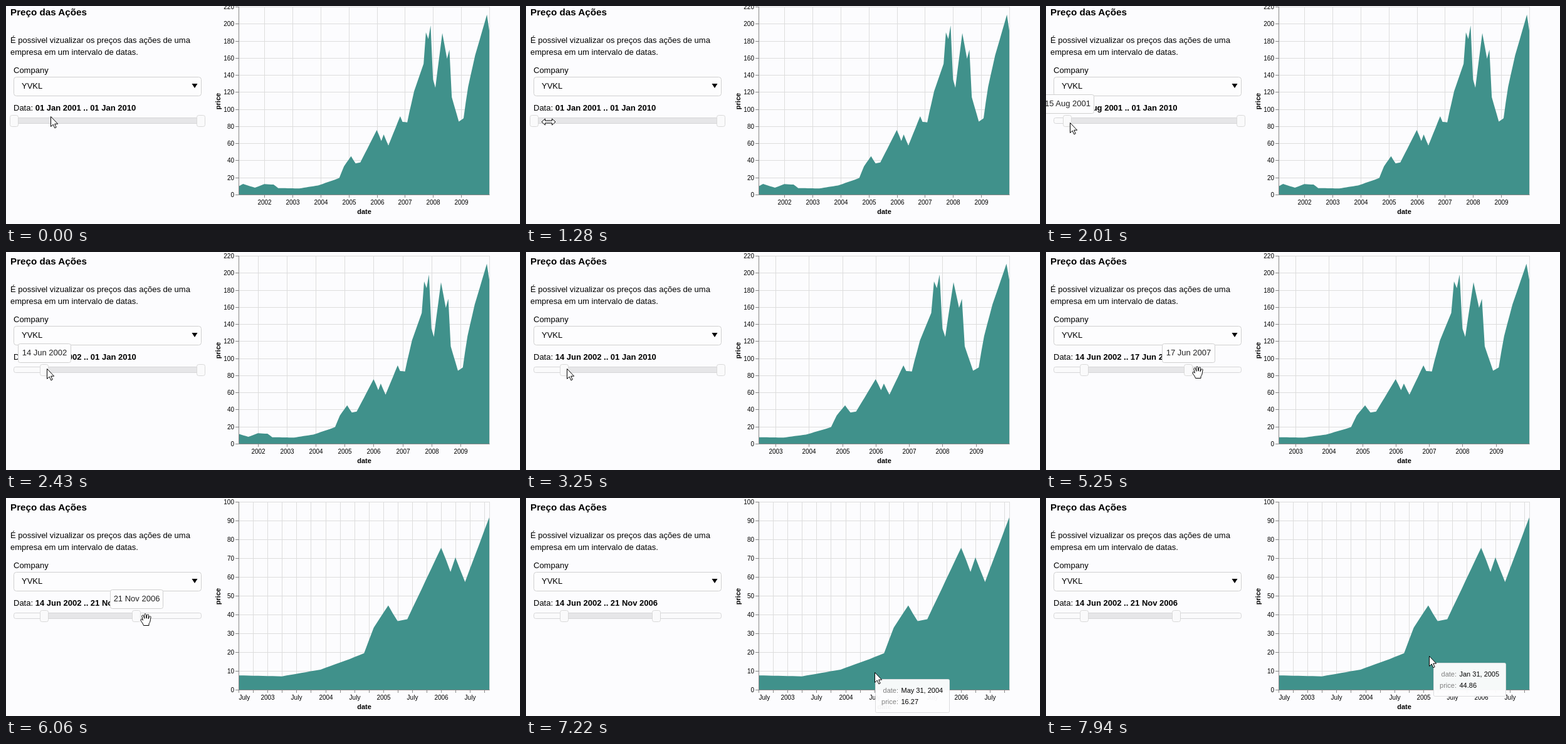
Animation, 820 px wide and 348 px high, one loop 7.99 s. Source, as an HTML page:

```html
<!DOCTYPE html>
<html lang="pt">
<head>
<meta charset="utf-8">
<title>Preço das Ações</title>
<style>
  html, body { margin: 0; width: 100%; height: 100%; overflow: hidden; background: #fcfcfe; }
  svg { display: block; width: 820px; height: 348px; font: 13px "Liberation Sans", Arial, sans-serif; fill: #000; }
  .box { fill: #fdfdfe; stroke: #d0d0d0; }
  .handle { fill: #fafafb; stroke: #d9d9d9; }
  .grid { stroke: #ddd; fill: none; }
  .axis { stroke: #888; fill: none; }
  .tick { font-size: 10px; }
  .name { font-size: 11px; font-weight: bold; text-anchor: middle; }
  .tip { font-size: 11px; }
  .cursor { fill: #fff; stroke: #000; stroke-linejoin: round; }
</style>
</head>
<body>
<svg viewBox="0 0 820 348">
  <g id="page">
    <text x="7" y="20" font-size="15.2" font-weight="bold">Preço das Ações</text>
    <text x="7" y="64">É possivel vizualizar os preços das ações de uma</text>
    <text x="7" y="83">empresa em um intervalo de datas.</text>
    <text x="12" y="112">Company</text>
    <rect class="box" x="12.5" y="118.5" width="299" height="30" rx="4"/>
    <text x="25" y="137">YVKL</text>
    <path d="M296.5 129H305.5L301 136Z"/>
    <text x="12" y="172">Data: <tspan id="range" font-weight="bold"></tspan></text>
    <rect x="12.5" y="183.5" width="299" height="9" rx="3" fill="#fafafb" stroke="#d6d6d8"/>
    <rect id="span" y="183.5" height="9" fill="#e6e6e8" stroke="#d6d6d8"/>
    <rect id="handleA" class="handle" y="179.5" width="13" height="18" rx="3"/>
    <rect id="handleB" class="handle" y="179.5" width="13" height="18" rx="3"/>
    <g id="chart"></g>
    <g id="bubble">
      <rect class="box" x="-42" y="147" width="84" height="30" rx="3"/>
      <text id="bubbleText" y="165" text-anchor="middle" fill="#222"></text>
    </g>
  </g>
  <g id="tip" class="tip">
    <rect id="tipBox" x="0.5" y="0.5" height="53" rx="2" fill="#fdfdfe" fill-opacity=".96" stroke="#dcdcde"/>
    <text x="37" y="22" text-anchor="end" fill="#808080">date:</text>
    <text x="37" y="40" text-anchor="end" fill="#808080">price:</text>
    <text id="tipDate" x="41.5" y="22"></text>
    <text id="tipPrice" x="41.5" y="40"></text>
  </g>
  <g id="cursor" class="cursor">
    <path id="arrow" d="M.5 .5V16.5L4.2 13.1L6.8 18.8L9.2 17.7L6.7 12.2H11.6Z"/>
    <path id="resize" d="M-11 0L-5.5 -5V-1.8H5.5V-5L11 0L5.5 5V1.8H-5.5V5Z"/>
    <path id="hand" d="M-3.5 9.5C-4 6.5 -8 3 -8 .8C-8 -1 -5.8 -1 -4.6 1.2L-6.2 -5C-6.4 -7.3 -4 -7.6 -3.4 -5.6L-2.2 -1.6L-2.3 -7.4C-2.2 -9.6 .3 -9.6 .5 -7.5L.9 -1.8L2 -7C2.5 -8.9 4.8 -8.4 4.6 -6.4L4 -1.2L5.6 -4.5C6.6 -6 8.6 -5 8 -3.2C7.2 0 7.6 4 5 6.8V9.5Z"/>
  </g>
</svg>
<script>
const LOOP = 7990, DAY = 864e5, START = Date.UTC(2001, 0, 1), DAYS = 3287;
const LEFT = 371, TOP = 6, W = 400, H = 300;
const MONTHS = 'Jan Feb Mar Apr May Jun Jul Aug Sep Oct Nov Dec'.split(' ');

// turning points of the price: [months since January 2001, price]
const TURNS = [
  [1, 9.5], [3, 12.5], [8, 8], [12, 12.2], [16, 11.7], [18, 7.6], [27, 7.1], [35, 10.7],
  [41, 16.27], [44, 19.4], [46, 33], [49, 44.86], [51, 36.5], [53, 37.5], [60, 75.5],
  [62, 62.7], [63, 70.4], [65, 57.3], [70, 91.7], [71, 85], [73, 84.6], [76, 121],
  [80, 153], [81, 190], [82, 182], [83, 198], [84, 135], [85, 125], [88, 189],
  [90, 159], [91, 169.5], [92, 114], [95, 85.4], [97, 89.3], [99, 126], [102, 163],
  [107, 210.7], [108, 192]];

// the chart is redrawn in steps and trails the slider
const STEP = 200, LAG = 500;
const DRAG_A = [[1690, 13], [2400, 61]];
const DRAG_B = [[4720, 311], [5450, 208]];
const HOVER_AT = 6320, TIP_AT = 7020, TIP_LAG = 18;
const POINTER = [
  [130, 71, 176], [1280, 36, 185], [1500, 17, 186], [1690, 17, 186], [2400, 65, 186],
  [3670, 65, 186], [4400, 319, 188], [4530, 326, 183], [4720, 326, 183], [5450, 223, 194],
  [HOVER_AT, 223, 194], [7090, 510, 284], [7220, 556, 278], [7800, 619, 264],
  [7900, 619, 264], [7920, 611, 252]];
const SHAPES = [[0, 'arrow'], [350, 'resize'], [1450, 'arrow'], [4440, 'hand'], [HOVER_AT, 'arrow']];

const $ = id => document.getElementById(id);
const set = (id, attrs) => { for (const k in attrs) $(id).setAttribute(k, attrs[k]); };
const show = (id, on) => set(id, { display: on ? 'inline' : 'none' });
const smooth = p => p * p * (3 - 2 * p);
const linear = p => p;
const two = n => String(n).padStart(2, '0');
const monthTime = m => Date.UTC(2001, m, 1);

function track(keys, t, ease) {
  if (t <= keys[0][0]) return keys[0].slice(1);
  const i = keys.findIndex(k => k[0] > t);
  if (i < 0) return keys[keys.length - 1].slice(1);
  const a = keys[i - 1], b = keys[i];
  const p = ease((t - a[0]) / (b[0] - a[0]));
  return a.slice(1).map((v, j) => v + (b[j + 1] - v) * p);
}

const price = m => track(TURNS, m, linear)[0];
const pointer = t => track(POINTER, t, t > HOVER_AT ? linear : smooth);
const handles = t => [DRAG_A, DRAG_B].map(keys => track(keys, t, smooth)[0]);
const sliderDate = x => new Date(START + Math.floor((x - 13) / 298 * DAYS) * DAY);
const sliderMonth = x => {
  const d = sliderDate(x);
  return (d.getUTCFullYear() - 2001) * 12 + d.getUTCMonth();
};

function sliderText(x) {
  const d = sliderDate(x);
  return `${two(d.getUTCDate())} ${MONTHS[d.getUTCMonth()]} ${d.getUTCFullYear()}`;
}

function scaleX(a, b) {
  const t0 = monthTime(a), t1 = monthTime(b);
  return m => LEFT + (monthTime(m) - t0) / (t1 - t0) * W;
}

function niceStep(max) {
  const raw = max / 8, pow = 10 ** Math.floor(Math.log10(raw)), r = raw / pow;
  return pow * (r >= Math.sqrt(50) ? 10 : r >= Math.sqrt(10) ? 5 : r >= Math.SQRT2 ? 2 : 1);
}

function chartMarkup(a, b) {
  const x = scaleX(a, b), bottom = TOP + H;
  const values = Array.from({ length: b - a + 1 }, (_, i) => price(a + i));
  const step = niceStep(Math.max(...values));
  const max = Math.ceil(Math.max(...values) / step) * step;
  const y = v => bottom - v / max * H;
  let grid = '', ticks = '', labels = '';

  for (let v = 0; v <= max; v += step) {
    const py = Math.round(y(v)) + .5;
    grid += `M${LEFT} ${py}h${W}`;
    ticks += `M${LEFT} ${py}h-5`;
    labels += `<text x="364" y="${py + 3.5}" text-anchor="end">${v}</text>`;
  }

  const every = b - a < 60 ? 3 : 12;
  let n = 0;
  for (let m = Math.ceil(a / every) * every; m < b; m += every, n++) {
    const px = Math.round(x(m)) + .5;
    grid += `M${px} ${TOP}v${H}`;
    ticks += `M${px} ${bottom}v5`;
    if (every === 3 && n % 2) continue;
    const word = m % 12 ? ['', 'April', 'July', 'October'][m % 12 / 3] : 2001 + m / 12;
    const anchor = px < LEFT + 2 ? 'start' : 'middle';
    labels += `<text x="${px}" y="322" text-anchor="${anchor}">${word}</text>`;
  }

  const line = values.map((v, i) => `L${x(a + i).toFixed(2)} ${y(v).toFixed(2)}`).join('');
  return `<rect class="grid" x="${LEFT + .5}" y="${TOP + .5}" width="${W}" height="${H}"/>
    <path class="grid" d="${grid}"/>
    <path fill="#40918b" d="M${LEFT} ${bottom}${line}V${bottom}Z"/>
    <path class="axis" d="${ticks}M${LEFT + .5} ${TOP}v${H + .5}h${W}"/>
    <g class="tick">${labels}</g>
    <text class="name" x="571.5" y="337">date</text>
    <text class="name" transform="translate(342 157) rotate(-90)">price</text>`;
}

let drawn = '';
function drawChart(a, b) {
  const key = `${a}-${b}`;
  if (key === drawn) return;
  $('chart').innerHTML = chartMarkup(a, b);
  drawn = key;
}

function drawTip(t, a, b) {
  show('tip', t >= TIP_AT);
  if (t < TIP_AT) return;
  const [ax, ay] = pointer(t - TIP_LAG), x = scaleX(a, b);
  let best = a;
  for (let m = a; m <= b; m++)
    if (Math.abs(x(m) - ax) < Math.abs(x(best) - ax)) best = m;
  const d = new Date(monthTime(best) - DAY);
  $('tipDate').textContent = `${MONTHS[d.getUTCMonth()]} ${two(d.getUTCDate())}, ${d.getUTCFullYear()}`;
  $('tipPrice').textContent = price(best).toFixed(2);
  set('tipBox', { width: Math.round($('tipDate').getComputedTextLength() + 51) });
  set('tip', { transform: `translate(${Math.floor(ax + 7.5)} ${Math.floor(ay + 11)})` });
}

function render(t) {
  const seen = Math.floor(t / STEP) * STEP - LAG;
  const [seenA, seenB] = handles(seen);
  const first = sliderMonth(seenA) + 1, last = sliderMonth(seenB);
  drawChart(first, last);
  set('page', { transform: `translate(0 ${seen < DRAG_A[0][0] ? -5 : 0})` });

  const [a, b] = handles(t);
  set('handleA', { x: Math.round(a) - 6.5 });
  set('handleB', { x: Math.round(b) - 6.5 });
  set('span', { x: a, width: b - a });
  $('range').textContent = `${sliderText(a)} .. ${sliderText(b)}`;

  const dragA = t >= DRAG_A[0][0] && t < 2700;
  const dragB = t >= DRAG_B[0][0] && t < HOVER_AT;
  const held = dragA ? a : b;
  show('bubble', dragA || dragB);
  set('bubble', { transform: `translate(${Math.round(held) + .5} -.5)` });
  $('bubbleText').textContent = sliderText(held);

  drawTip(t, first, last);

  const [px, py] = pointer(t);
  const shape = SHAPES.filter(s => s[0] <= t).pop()[1];
  for (const id of ['arrow', 'resize', 'hand']) show(id, id === shape);
  set('cursor', { transform: `translate(${Math.round(px)} ${Math.round(py)})` });
}

const began = performance.now();
function frame() {
  render((performance.now() - began) % LOOP);
  requestAnimationFrame(frame);
}
frame();
</script>
</body>
</html>
```
